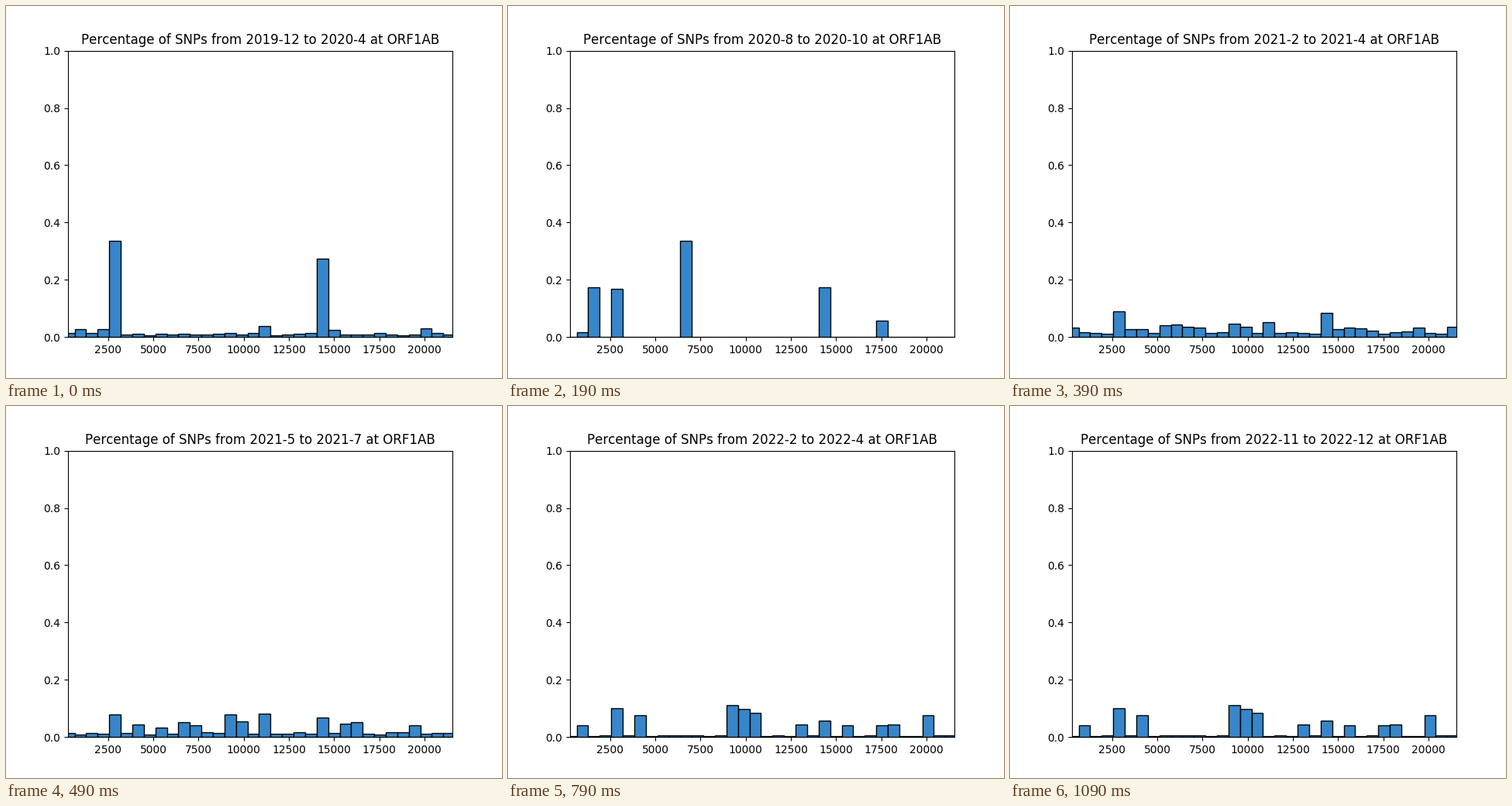
A matplotlib script for the animation above (1190 ms loop, 640 by 480 pixels).

```python
import matplotlib.pyplot as plt
import numpy as np
from matplotlib.animation import FuncAnimation

BINS, BIN_WIDTH = 34, 638
PERIODS = 12
TICK = 10           # ms
TICKS = 119         # the first period lasts 9 ticks, the others 10

rng = np.random.default_rng(4)


def profile(level, peaks):
    """Low random background with a few mutation hotspots on top."""
    share = level * rng.uniform(0.5, 1.5, BINS)
    for place, height in peaks.items():
        share[place] = height
    return share


early = profile(0.009, {1: 0.027, 3: 0.027, 4: 0.336, 17: 0.038,
                        22: 0.274, 23: 0.025, 31: 0.03})
autumn = profile(0.001, {1: 0.017, 2: 0.174, 4: 0.168, 10: 0.336,
                         22: 0.174, 27: 0.057})
winter = profile(0.018, {0: 0.052, 4: 0.103, 5: 0.038, 8: 0.046, 9: 0.079,
                         22: 0.103, 23: 0.043, 26: 0.035, 33: 0.057})
summer = profile(0.012, {4: 0.079, 6: 0.044, 8: 0.034, 10: 0.053, 11: 0.042,
                         14: 0.079, 15: 0.056, 17: 0.082, 22: 0.067,
                         24: 0.047, 25: 0.052, 30: 0.042})
late = profile(0.004, {1: 0.04, 4: 0.102, 6: 0.076, 14: 0.112, 15: 0.097,
                       16: 0.084, 20: 0.045, 22: 0.058, 24: 0.042,
                       27: 0.041, 28: 0.043, 31: 0.075})

# Periods between two waves blend their profiles
waves = {0: early, 2: autumn, 3: winter, 5: summer, 7: summer, 8: late}
shares = np.array([np.interp(range(PERIODS), list(waves), heights)
                   for heights in zip(*waves.values())]).T


def month_name(m):
    """Name a month counted from January 2020."""
    return f"{2020 + m // 12}-{m % 12 + 1}"


def title(period):
    start = 3 * period + 1 if period else -1
    end = min(3 * period + 3, 35)
    return (f"Percentage of SNPs from {month_name(start)} "
            f"to {month_name(end)} at ORF1AB")


plt.rcParams.update({"font.family": "DejaVu Sans", "text.kerning_factor": 6})
fig, ax = plt.subplots(figsize=(6.4, 4.8), dpi=100)
ax.set_xlim(270, 21555)
ax.set_ylim(0, 1)
ax.set_xticks(range(2500, 20001, 2500))
bars = ax.bar(np.arange(BINS) * BIN_WIDTH, shares[0], BIN_WIDTH, align="edge",
              color="#3786c9", edgecolor="black", linewidth=1)
heading = ax.set_title(title(0))


def update(tick):
    period = (tick + 1) // 10
    for bar, share in zip(bars, shares[period]):
        bar.set_height(share)
    heading.set_text(title(period))
    return [*bars, heading]


anim = FuncAnimation(fig, update, frames=TICKS, interval=TICK,
                     repeat=True, repeat_delay=0, blit=False)
plt.show()
```
